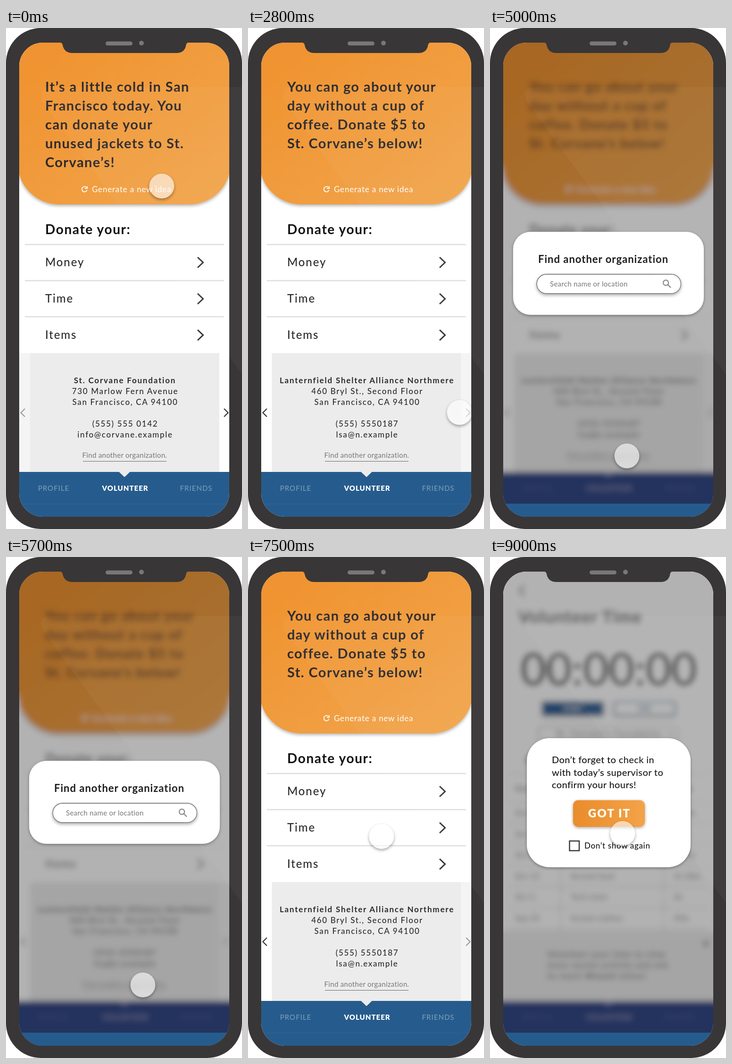
These frames come from a looping animation (500x1062 px, 9100 ms). An HTML page:

```html
<!DOCTYPE html>
<html lang="en">
<head>
<meta charset="utf-8">
<title>Volunteer app</title>
<style>
html, body { margin: 0; width: 100%; height: 100%; overflow: hidden; background: #fff; }
svg { display: block; width: 100vw; height: 100vh; }
text { font-family: Lato, "Open Sans", sans-serif; font-weight: 500; font-size: 17px; letter-spacing: 1.65px; fill: #2c2a2e; white-space: pre; }
.mid { text-anchor: middle; }
.idea { font-size: 29px; font-weight: 700; letter-spacing: 1.4px; }
.head { font-size: 28px; font-weight: 700; letter-spacing: 1.6px; fill: #111; }
.item { font-size: 24px; letter-spacing: 1.85px; }
.bold { font-weight: 700; letter-spacing: 1.8px; }
.small { font-size: 15px; font-weight: 400; letter-spacing: .3px; fill: #777; }
.regen { font-weight: 400; letter-spacing: .8px; fill: #fff; }
.nav { font-size: 15px; letter-spacing: 1px; fill: #fff; fill-opacity: .38; }
.nav.on { font-weight: 900; fill-opacity: 1; }
.find { font-size: 22px; font-weight: 700; letter-spacing: 1px; fill: #1c1b1d; }
.title { font-size: 36px; font-weight: 700; letter-spacing: 1.3px; fill: #1d1d1f; }
.clock { font-size: 94px; letter-spacing: 0; fill: #1d1e20; }
.btn { font-size: 13px; font-weight: 700; letter-spacing: .3px; }
.th { letter-spacing: 1.4px; }
.td { font-size: 15px; letter-spacing: 1.2px; }
.note { font-size: 20px; letter-spacing: .37px; fill: #161616; }
.check { letter-spacing: .65px; fill: #161616; }
.got { font-size: 24px; font-weight: 900; letter-spacing: 2.1px; fill: #fff; }
.line { fill: none; stroke: #dedee0; stroke-width: 2.6; }
.icon { fill: none; stroke: #38363a; stroke-width: 3; }
</style>
</head>
<body>
<svg id="stage" viewBox="0 0 500 1062" preserveAspectRatio="none"></svg>
<script>
const LOOP = 9100, STEP = 100, FADE = 350;

const text = (x, y, str, cls = '') => `<text x="${x}" y="${y}" class="${cls}">${str}</text>`;
const lines = (x, y, gap, rows, cls) => rows.map((s, i) => text(x, y + i * gap, s, cls)).join('');
const rect = (x, y, w, h, fill, more = '') =>
  `<rect x="${x}" y="${y}" width="${w}" height="${h}" fill="${fill}" ${more}/>`;
const path = (d, cls, more = '') => `<path d="${d}" class="${cls}" ${more}/>`;
const group = (id, body, more = '') => `<g id="${id}" ${more}>${body}</g>`;
const shadow = (id, dy, blur, alpha) =>
  `<filter id="${id}" x="-30%" y="-30%" width="160%" height="160%">
    <feDropShadow dx="0" dy="${dy}" stdDeviation="${blur}" flood-opacity="${alpha}"/></filter>`;

const defs = `<defs>
  <linearGradient id="orange" gradientUnits="userSpaceOnUse" x1="100" y1="30" x2="400" y2="390">
    <stop offset="0" stop-color="#f09330"/><stop offset="1" stop-color="#f1a54c"/></linearGradient>
  <linearGradient id="gold"><stop offset="0" stop-color="#ea8c2b"/><stop offset="1" stop-color="#f3a348"/></linearGradient>
  <clipPath id="screen"><rect x="28" y="31" width="445" height="1005" rx="50"/></clipPath>
  <clipPath id="page"><rect x="0" y="0" width="500" height="1008.5"/></clipPath>
  <filter id="blur" filterUnits="userSpaceOnUse" x="-60" y="-60" width="620" height="1180"><feGaussianBlur stdDeviation="6.5"/></filter>
  ${shadow('soft', 3, 3, .3)}${shadow('lift', 2, 3, .35)}${shadow('dot', 3, 3, .6)}
</defs>`;

const nav = rect(-40, 941, 580, 140, '#265c8d') +
  rect(28, 1008.5, 445, 1, '#fff', 'opacity=".05"') +
  path('M239 940.5h24l-12 11.5z', '', 'fill="#ececec"') +
  text(101, 981, 'PROFILE', 'nav mid') +
  text(252.5, 981, 'VOLUNTEER', 'nav on mid') +
  text(403, 981, 'FRIENDS', 'nav mid');

const refresh = path('M170.5 338A5.6 5.6 0 1 0 171.6 343.5M172 335.5V340H167.3', 'icon',
  'style="stroke:#fff;stroke-width:1.8"');

const arrow = (x, dir, color) =>
  path(`M${x - 4 * dir} 807l${8.5 * dir} 8.5l${-8.5 * dir} 8.5`, 'icon', `style="stroke:${color};stroke-width:2.2"`);

const contact = (id, rows, first) => group(id,
  rect(first ? -40 : 451, 689, first ? 91 : 89, 252, '#f4f4f4') +
  text(252, 753, rows[0], 'bold mid') +
  lines(252.5, 776, 23, rows.slice(1, 3), 'mid') +
  lines(252.5, 845, 23, rows.slice(3), 'mid') +
  arrow(36, -1, first ? '#9a9a9a' : '#333') +
  arrow(466, 1, first ? '#333' : '#9a9a9a'));

const listRow = (label, i) => {
  const y = 497 + i * 77;
  return path(`M40 ${459 + i * 76.5}H462`, 'line') + text(83, y + 8, label, 'item') +
    path(`M406 ${y - 11}l11.5 11l-11.5 11`, 'icon');
};

const home = group('home',
  rect(-40, -40, 580, 1140, '#fff') +
  path('M-30-60H530V290H476A88 86 0 0 1 388 374H113A88 86 0 0 1 25 290H-30Z', '',
    'fill="url(#orange)" filter="url(#soft)"') +
  group('idea1', lines(83, 135, 40, ['It’s a little cold in San', 'Francisco today. You', 'can donate your',
    'unused jackets to St.', 'Corvane’s!'], 'idea')) +
  group('idea2', lines(83, 135, 40, ['You can go about your', 'day without a cup of', 'coffee. Donate $5 to',
    'St. Corvane’s below!'], 'idea')) +
  refresh + text(182, 348, 'Generate a new idea', 'regen') +
  text(83, 437, 'Donate your:', 'head') +
  ['Money', 'Time', 'Items'].map(listRow).join('') +
  rect(50.5, 689, 401.5, 252, '#ececec') +
  contact('org1', ['St. Corvane Foundation', '730 Marlow Fern Avenue', 'San Francisco, CA 94100',
    '(555) 555 0142', 'info@corvane.example'], true) +
  contact('org2', ['Lanternfield Shelter Alliance Northmere', '460 Bryl St., Second Floor',
    'San Francisco, CA 94100', '(555) 5550187', 'lsa@n.example'], false) +
  text(251.5, 911, 'Find another organization.', 'small mid') +
  rect(163, 918, 177, 1, '#666') + nav);

const activity = [
  ['Oct 31', 'Sorted clothes', '2h 3m'], ['Oct 27', 'Sorted food cans', '57m'],
  ['Oct 20', 'Served food', '1h 2m'], ['Oct 12', 'Served food', '1h 30m'],
  ['Oct 5', 'Tech tutor', '2h'], ['Sep 29', 'Sorted clothes', '49m']];
const columns = [53, 171, 389];
const tableRow = (cells, y, cls) => cells.map((s, i) => text(columns[i], y, s, cls)).join('');

const timer = group('timer',
  rect(-40, -40, 580, 1140, '#fff') +
  path('M73 60L62 71.3L73 82.5', 'icon') +
  text(60, 140, 'Volunteer Time', 'title') +
  text(251.5, 272, '00:00:00', 'clock mid') +
  rect(110.5, 306.5, 130, 29.5, '#2a6194', 'filter="url(#lift)"') +
  text(175.5, 326, 'START', 'btn mid" style="fill:#fff') +
  rect(263.5, 307.5, 128, 27.5, '#fff', 'stroke="#2a6194" stroke-width="2" filter="url(#lift)"') +
  text(328, 326, 'END', 'btn mid" style="fill:#2a6194') +
  rect(102.5, 359, 297, 32, '#fff', 'rx="7" stroke="#59575b" stroke-width="1.2"') +
  text(140, 381, 'St. Corvane’s Foundation') +
  path('M376.5 373.5l5.5 5.5l5.5-5.5', 'icon', 'style="stroke-width:1.8"') +
  text(75, 440, 'Recent Activity', 'item') +
  path('M40 460H462M149.5 460V800M368 460V800', 'line') +
  tableRow(['Date', 'Description', 'Time'], 497, 'th') +
  activity.map((r, i) => tableRow(r, 548 + i * 44.6, 'td')).join('') +
  path(activity.concat(0).map((_, i) => `M40 ${520.5 + i * 44.6}H462`).join(''), 'line') +
  rect(-40, 796, 580, 160, '#ececec', 'filter="url(#lift)"') +
  path('M452 814l11 11m0-11l-11 11', 'icon', 'style="stroke:#111;stroke-width:2.2"') +
  lines(121, 848, 23, ['Volunteer your time to view', 'more recent activity and aim',
    'to reach <tspan font-weight="700" style="font-weight:700">Wizard</tspan> status!'], '') + nav);

const dialog = (id, under, body) => group(id,
  `<g clip-path="url(#page)"><g filter="url(#blur)"><use href="#${under}"/>
    ${rect(-40, 941, 580, 140, '#3c3c83', 'opacity=".6"')}</g>
    ${rect(0, 0, 500, 1062, '#000', 'opacity=".3"')}</g>
    ${rect(28, 1008.5, 445, 40, '#265c8d')}` + body);

const search = dialog('search', 'home',
  rect(49, 432, 404, 176, '#fff', 'rx="37" filter="url(#lift)"') +
  text(102, 498, 'Find another organization', 'find') +
  rect(99, 522, 305.5, 41, '#fff', 'rx="20.5" stroke="#8b898c" stroke-width="1.8" filter="url(#soft)"') +
  text(127, 548, 'Search name or location', 'small') +
  path('M378.2 540a5.6 5.6 0 1 1-11.2 0a5.6 5.6 0 1 1 11.2 0M376.5 544l6.5 6.5', 'icon',
    'style="stroke:#858386;stroke-width:2.2"'));

const reminder = dialog('reminder', 'timer',
  rect(78, 384, 347, 273.5, '#fff', 'rx="48" filter="url(#lift)"') +
  lines(131, 437, 26.5, ['Don’t forget to check in', 'with today’s supervisor to', 'confirm your hours!'], 'note') +
  rect(176, 515.5, 152, 56.5, 'url(#gold)', 'rx="11" filter="url(#lift)"') +
  text(253, 552, 'GOT IT', 'got mid') +
  rect(168.5, 602, 20.5, 20.5, '#fff', 'stroke="#333" stroke-width="2.4"') +
  text(200, 618, 'Don’t show again', 'check'));

const hardware =
  path('M112 30Q119.5 31 120 36Q123 53 141 53H361Q379 53 381.5 36Q382 31 389 30Z', '', 'fill="#393637"') +
  rect(211, 28.5, 57, 8.5, '#79777a', 'rx="4.25"') +
  '<circle cx="287" cy="32" r="5" fill="#79777a"/>' +
  path('M98 125H500V734L78 156Q66 125 98 125Z', '', 'fill="#fff" opacity=".03"');

const stage = document.getElementById('stage');
stage.innerHTML = defs + rect(0, 0, 500, 1062, '#393637', 'rx="74"') +
  `<g clip-path="url(#screen)">${home}${search}${timer}${reminder}</g>${hardware}
  <g clip-path="url(#screen)"><circle id="cursor" r="26.3" fill="#fff" opacity=".6" filter="url(#dot)"/></g>`;

const $ = id => document.getElementById(id);
const clamp = v => Math.min(1, Math.max(0, v));
const smooth = p => p * p * (3 - 2 * p);
const fade = (t, start) => 1 - (1 - clamp((t - start) / FADE)) ** 2;

// time, x, y of the touch point
const touch = [[0, 330, 335], [400, 323, 346], [1400, 323, 346], [2200, 448, 815], [3200, 448, 815],
  [4400, 290, 907], [6000, 290, 907], [6600, 306, 670], [7000, 306, 670], [7600, 281, 586], [LOOP, 281, 586]];

function touchAt(t) {
  const i = touch.findIndex(k => k[0] > t);
  const [t0, x0, y0] = touch[i - 1], [t1, x1, y1] = touch[i];
  const p = smooth((t - t0) / (t1 - t0));
  return [x0 + (x1 - x0) * p, y0 + (y1 - y0) * p];
}

function show(id, alpha) {
  const el = $(id);
  el.setAttribute('opacity', alpha);
  el.style.display = alpha > 0 ? '' : 'none';
}

function draw(t) {
  const idea = fade(t, 450), org = fade(t, 2350);
  show('idea1', 1 - idea);
  show('idea2', idea);
  show('org1', 1 - org);
  show('org2', org);
  show('search', fade(t, 4650) - fade(t, 6650));
  // the dialog copies this page, so it stays fully opaque once faded in
  show('timer', fade(t, 7850));
  show('reminder', fade(t, 8550));
  const [x, y] = touchAt(t);
  $('cursor').setAttribute('transform', `translate(${x} ${y})`);
}

function tick() {
  draw(Math.floor(performance.now() % LOOP / STEP) * STEP);
  requestAnimationFrame(tick);
}
tick();
</script>
</body>
</html>
```
